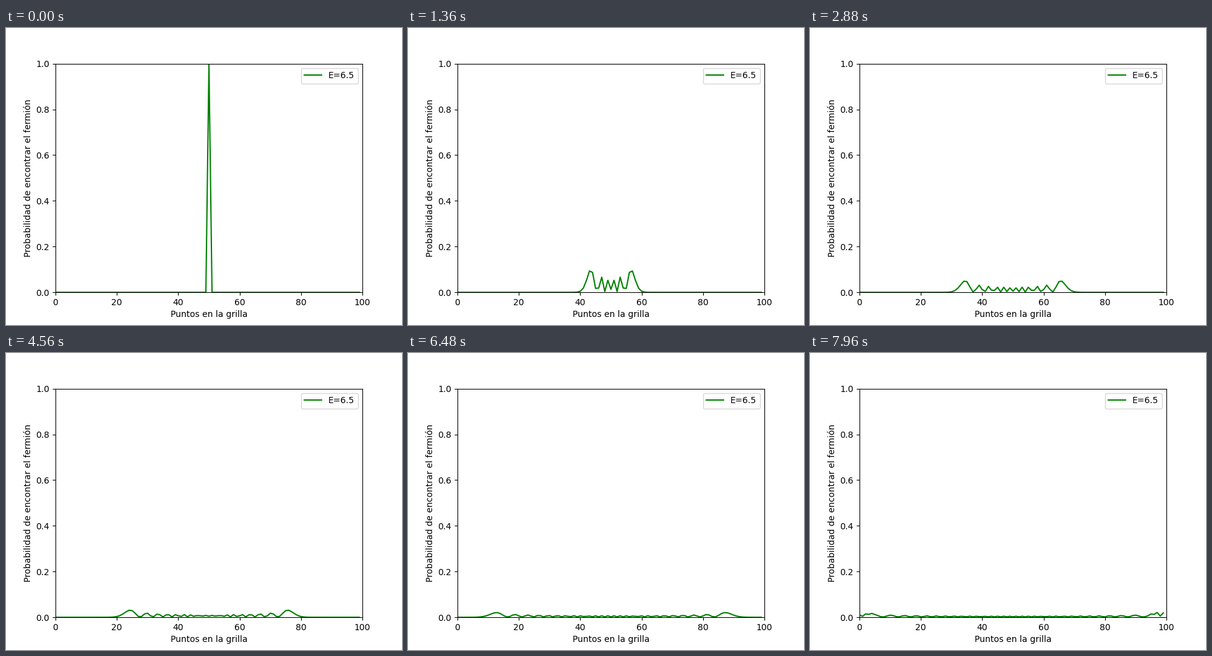
Animation of 640x480 px, one loop 8000 ms. Source, as a matplotlib script:

```python
import numpy as np
import matplotlib.pyplot as plt
from matplotlib.animation import FuncAnimation

SITES = 100
START = 50
FRAMES = 200
INTERVAL = 40       # ms
STEP = 0.12425      # evolution time per frame
DAMPING = 0.0038    # loss of norm from the implicit time stepping

plt.rcParams["font.family"] = "DejaVu Sans"

# Eigenmodes of the discrete Laplacian with open ends
sites = np.arange(SITES)
k = np.pi * np.arange(1, SITES + 1) / (SITES + 1)
energy = 2 - 2 * np.cos(k)
modes = np.sqrt(2 / (SITES + 1)) * np.sin(np.outer(sites + 1, k))


def probability(t):
    """Chance of finding the particle at each site after time t."""
    phase = np.exp(-1j * energy * t - DAMPING * energy**2 * t)
    return np.abs(modes @ (phase * modes[START])) ** 2


fig, ax = plt.subplots(figsize=(6.4, 4.8), dpi=100)
line, = ax.plot(sites, probability(0), color="g", label="E=6.5")
ax.set_xlim(0, 100)
ax.set_ylim(0, 1)
ax.set_xlabel("Puntos en la grilla")
ax.set_ylabel("Probabilidad de encontrar el fermión")
ax.legend(loc="upper right")


def update(frame):
    line.set_ydata(probability(STEP * max(frame - 1, 0)))
    return line,


anim = FuncAnimation(fig, update, frames=FRAMES, interval=INTERVAL,
                     repeat=True, repeat_delay=0)
plt.show()
```
